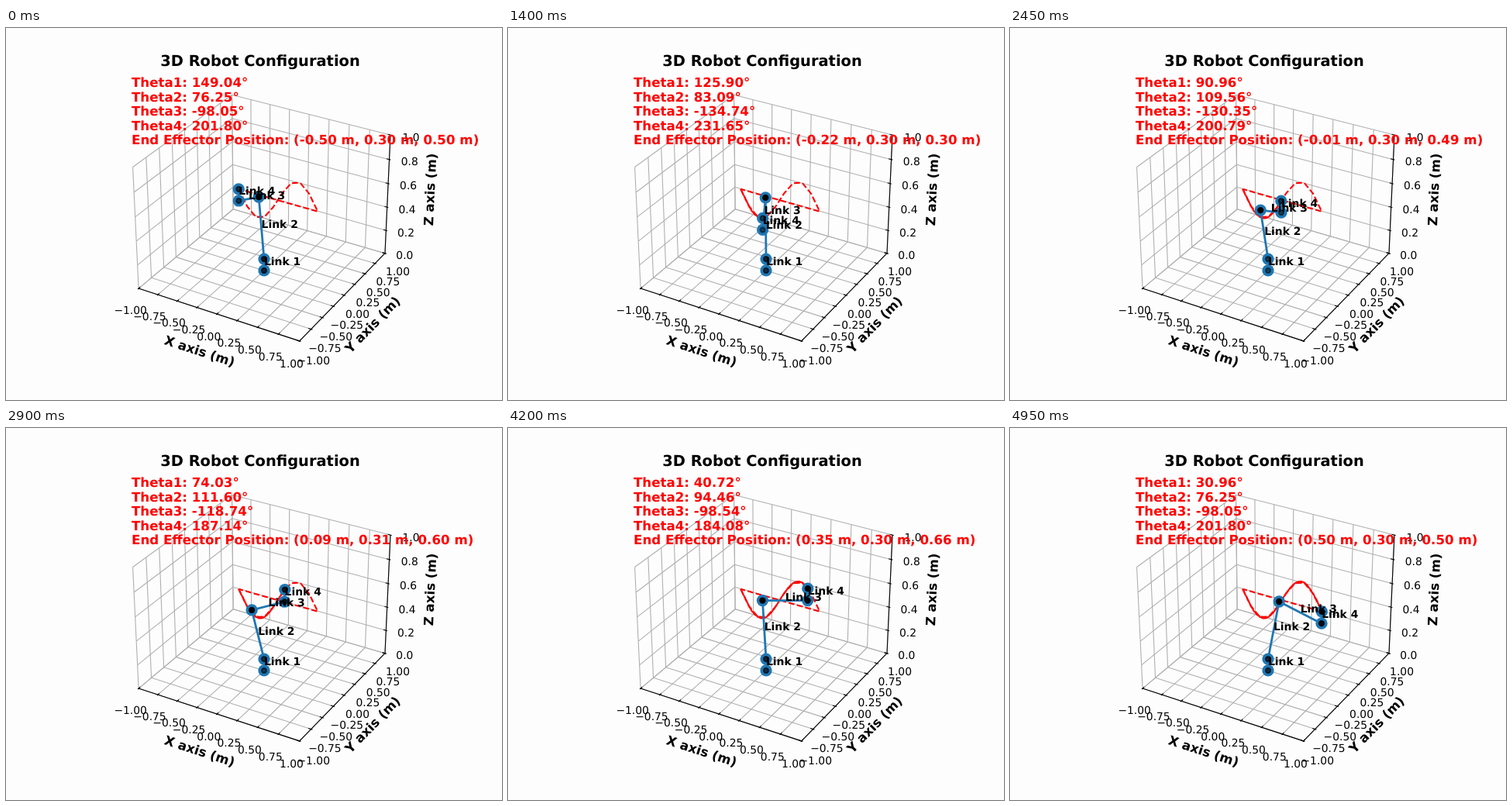
Recreate the animation shown at these times as an HTML page with a canvas. Size 640 by 480 pixels, loop 5 s.

```html
<!DOCTYPE html>
<html lang="en">
<head>
<meta charset="utf-8">
<title>3D Robot Configuration</title>
<style>
html, body { margin: 0; height: 100%; overflow: hidden; background: #fdfdfd; }
canvas { display: block; }
</style>
</head>
<body>
<canvas id="stage" width="640" height="480"></canvas>
<script>
const ctx = document.getElementById('stage').getContext('2d');
const STEPS = 100, STEP_MS = 50;
const PT = 100 / 72;            // pixels per typographic point
const BLUE = '#1f77b4', GRID = '#b0b0b0', RED = '#f00';
const ARM = 0.5, POST = 0.1;    // link lengths in metres
const { sin, cos, atan2, acos, hypot, PI, min, max, round } = Math;
const range = (n, f) => Array.from({ length: n }, (_, i) => f(i));

// Perspective view from elevation 30°, azimuth -60°, distance 10.
function view([x, y, z]) {
  const a = x * 0.595238, b = y * 0.595238, c = (z - 0.5) * 0.892857;
  const depth = 10 - (0.433013 * a - 0.75 * b + 0.5 * c);
  return [(0.866025 * a + 0.5 * b) / depth,
          (-0.25 * a + 0.433013 * b + 0.866025 * c) / depth,
          -10 / depth];
}
function project(p) {
  const [u, v] = view(p);
  return [333 + 1997.84 * u, 237.4 - 1997.84 * v];
}

function line(points, color, width, dash = []) {
  ctx.beginPath();
  points.forEach(p => ctx.lineTo(...project(p)));
  ctx.strokeStyle = color;
  ctx.lineWidth = width * PT;
  ctx.lineJoin = 'round';
  ctx.setLineDash(dash.map(d => d * width * PT));
  ctx.stroke();
}

function text(str, x, y, { size = 10, bold = true, align = 'left', color = '#000', angle = 0 } = {}) {
  ctx.save();
  ctx.font = `${bold ? 'bold ' : ''}${size * PT}px "DejaVu Sans", sans-serif`;
  ctx.textRendering = 'geometricPrecision';
  ctx.textAlign = align;
  ctx.fillStyle = color;
  ctx.translate(x, angle ? y : round(y));
  ctx.rotate(angle);
  ctx.fillText(str, 0, angle ? size * PT * 0.276 : 0);
  ctx.restore();
}

function axis(name, from, to, labelAt, ticks, digits, tickAt, textAt) {
  line([from, to], '#000', 0.8);
  for (const t of ticks) {
    line(tickAt(t), '#000', 0.8);
    const [x, y] = project(textAt(t));
    text(t.toFixed(digits).replace('-', '\u2212'), x, y + 11, { bold: false, align: 'center' });
  }
  const [x0, y0] = project(from), [x1, y1] = project(to);
  text(`${name} axis (m)`, ...project(labelAt),
    { size: 12, align: 'center', angle: atan2(y1 - y0, x1 - x0) });
}

function drawAxes() {
  const wide = range(9, i => -1 + i / 4), tall = range(6, i => i / 5);
  for (const t of wide) {
    line([[t, -1, 0], [t, 1, 0], [t, 1, 1]], GRID, 0.8);
    line([[1, t, 0], [-1, t, 0], [-1, t, 1]], GRID, 0.8);
  }
  for (const t of tall) line([[-1, -1, t], [-1, 1, t], [1, 1, t]], GRID, 0.8);

  const out = 1.016, inn = 0.968, far = 1.166, low = -0.083, label = 1.361;
  axis('X', [-1, -1, 0], [1, -1, 0], [0, -label, -0.18], wide, 2,
    t => [[t, -out, 0], [t, -inn, 0]], t => [t, -far, low]);
  axis('Y', [1, -1, 0], [1, 1, 0], [label, 0, -0.18], wide, 2,
    t => [[out, t, 0], [inn, t, 0]], t => [far, t, low]);
  axis('Z', [1, 1, 0], [1, 1, 1], [label, label, 0.5], tall, 1,
    t => [[out, 1, t], [inn, 1, t]], t => [far, far, t]);
  text('3D Robot Configuration', 328, 49, { size: 14, align: 'center' });
}

const wave = x => [x, 0.3, 0.5 + 0.2 * sin(2 * PI * x)];
const waypoints = range(10, i => wave(-0.5 + i / 9));
waypoints.push(waypoints[0]);

// Reached position, with a few millimetres of sideways wobble.
function reached(i) {
  const [x, y, z] = wave(-0.5 + i / (STEPS - 1));
  return [x, y + 0.0055 * sin(i) * cos(0.65 * i), z];
}

// Inverse kinematics; the last link always points straight up.
function pose(i) {
  const [x, y, z] = wave(-0.5 + i / (STEPS - 1));
  const r = hypot(x, y), h = z - 2 * POST;
  const t1 = atan2(y, x);
  const t3 = -acos((r * r + h * h) / (2 * ARM * ARM) - 1);
  const t2 = atan2(h, r) - t3 / 2;
  const elbow = ARM * cos(t2);
  return {
    angles: [t1, t2, t3, PI - t2 - t3],
    joints: [[0, 0, 0], [0, 0, POST],
      [elbow * cos(t1), elbow * sin(t1), POST + ARM * sin(t2)],
      [x, y, z - POST], reached(i)]
  };
}

function disc(p, radius) {
  ctx.beginPath();
  ctx.arc(...project(p), radius * PT, 0, 2 * PI);
  ctx.fill();
}

// Black joint centres fade with distance from the viewer.
function drawCentres(joints) {
  const seen = joints.map(view);
  const spans = [0, 1, 2].map(k => {
    const values = seen.map(p => p[k]);
    return max(...values) - min(...values);
  });
  const nearest = min(...seen.map(p => p[2]));
  ctx.fillStyle = ctx.strokeStyle = '#000';
  ctx.lineWidth = 1.5 * PT;
  ctx.setLineDash([]);
  joints.forEach((p, k) => {
    ctx.globalAlpha = max(0.3, 1 - (seen[k][2] - nearest) / hypot(...spans));
    disc(p, Math.sqrt(20) / 2);
    ctx.stroke();
  });
  ctx.globalAlpha = 1;
}

function draw(i) {
  const { angles, joints } = pose(i);
  ctx.fillStyle = '#fdfdfd';
  ctx.fillRect(0, 0, 640, 480);
  drawAxes();

  line(waypoints, RED, 1.5, [3.7, 1.6]);
  line(range(i + 1, reached), RED, 1.5);
  line(joints, BLUE, 2);
  ctx.fillStyle = BLUE;
  joints.forEach(p => disc(p, 5.5));

  for (let k = 1; k < joints.length; k++) {
    const middle = joints[k].map((v, n) => (v + joints[k - 1][n]) / 2);
    text(`Link ${k}`, ...project(middle));
  }
  const rows = angles.map((a, k) => `Theta${k + 1}: ${(a * 180 / PI).toFixed(2)}°`);
  const place = joints[4].map(v => `${v.toFixed(2)} m`).join(', ');
  rows.push(`End Effector Position: (${place})`);
  rows.forEach((row, k) => text(row, 162, 76.1 + 18.48 * k, { size: 12, color: RED }));
  drawCentres(joints);
}

const start = performance.now();
function tick() {
  draw(Math.floor((performance.now() - start) / STEP_MS) % STEPS);
  requestAnimationFrame(tick);
}
tick();
</script>
</body>
</html>
```
